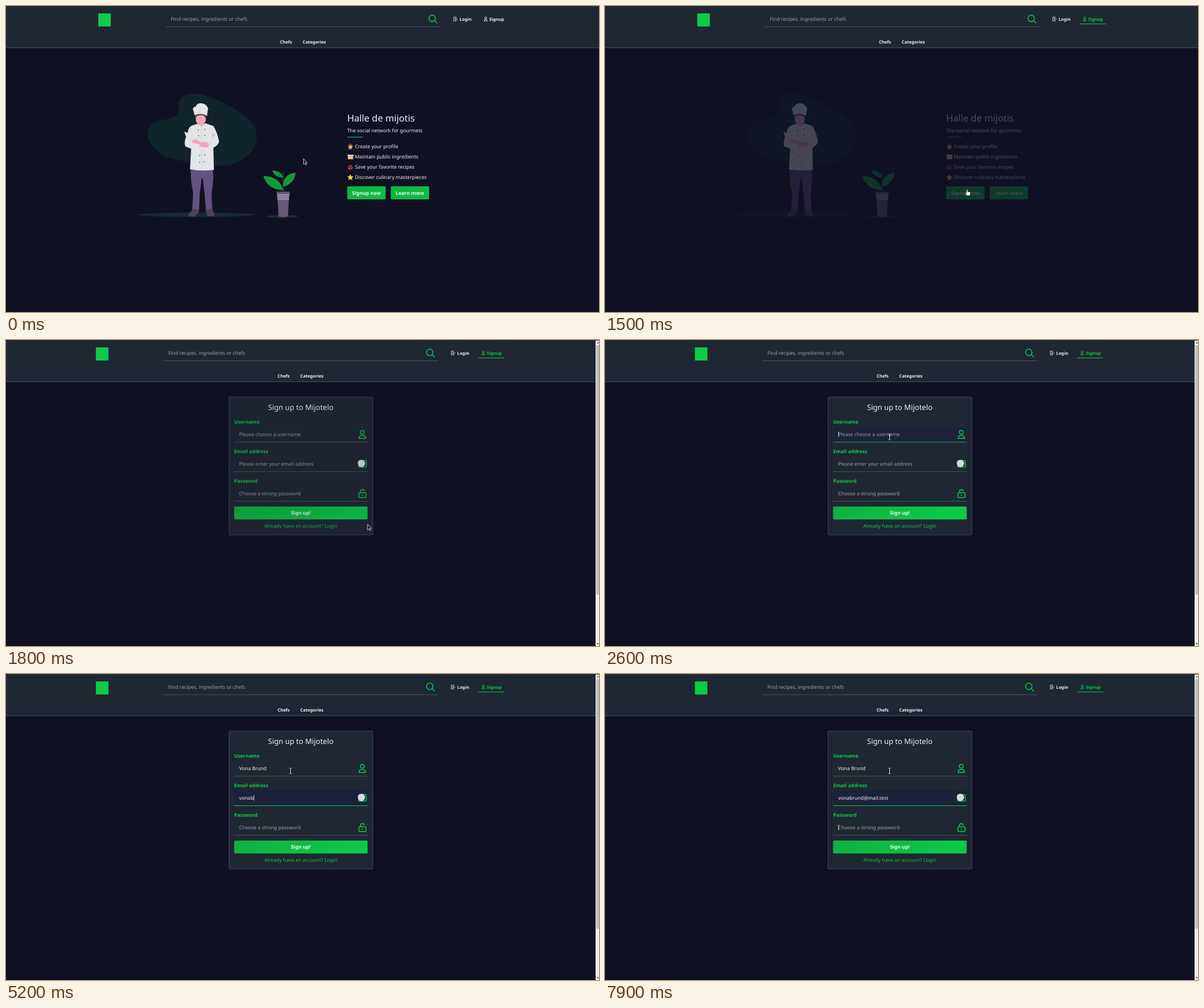
Recreate the animation shown at these times as an HTML page. Size 1041x538 px, loop 8000 ms.

```html
<!DOCTYPE html>
<html lang="en">
<head>
<meta charset="utf-8">
<title>Recipe site sign-up</title>
<style>
  html, body { margin: 0; width: 100%; height: 100%; overflow: hidden; background: #101023; }
  svg { display: block; width: 100%; height: 100%; }
  text { font: 8.69px "Noto Sans", "Open Sans", sans-serif; fill: #f2f3f5; text-rendering: geometricPrecision; white-space: pre; }
  .bold { font-weight: 700; }
  .nav { font-size: 7.6px; font-weight: 700; }
  .mid { text-anchor: middle; }
  .hint { fill: #9ca3af; }
  .green { fill: #0dcb48; }
  .line { fill: none; stroke: #0dcb48; stroke-width: 1.5; stroke-linecap: round; stroke-linejoin: round; }
  .bar { stroke: #0dcb48; stroke-width: 1.1; }
  .thin { fill: none; stroke: #f2f3f5; stroke-width: .9; }
  .rule { stroke: #465160; stroke-width: 1; }
  .active text { fill: #0dcb48; }
  .active .thin { stroke: #0dcb48; }
</style>
</head>
<body>
<svg viewBox="0 0 1041 538" preserveAspectRatio="none">
  <defs>
    <linearGradient id="wide" x2="1" y2=".2">
      <stop stop-color="#0fae40"/><stop offset="1" stop-color="#0ccb46"/>
    </linearGradient>
    <linearGradient id="small" x2="1" y2=".2">
      <stop stop-color="#0cb441"/><stop offset="1" stop-color="#0cbe44"/>
    </linearGradient>
  </defs>
  <rect width="1041" height="538" fill="#101023"/>
  <rect width="1041" height="73" fill="#1f2733"/>
  <rect width="1041" height=".8" fill="#2d3541"/>
  <path class="rule" d="M0 73.400H1041"/>

  <g id="header">
    <rect x="162" y="13" width="22" height="23" class="green"/>
    <text x="289.300" y="25.800" class="hint">Find recipes, ingredients or chefs</text>
    <path class="rule" d="M280 36.500H763"/>
    <path class="line" d="M752.800 26.300L756.600 30M753.800 21.800a5.700 5.700 0 1 1-11.400 0a5.700 5.700 0 0 1 11.400 0"/>
    <path class="thin" d="M790.500 20.300V19.600H786V26.200H790.500V25.400M793 23H788M789.800 21.200L788 23L789.800 24.800"/>
    <text x="796.300" y="25.800" class="nav">Login</text>
    <g id="signupLink">
      <circle class="thin" cx="842" cy="21" r="1.800"/>
      <path class="thin" d="M839.300 26.400q0-3 2.700-3t2.700 3z"/>
      <text x="848.300" y="25.800" class="nav">Signup</text>
    </g>
    <path id="signupRule" class="bar" d="M833 31.500H879"/>
    <text x="481" y="65.800" class="nav">Chefs</text>
    <text x="520.800" y="65.800" class="nav">Categories</text>
  </g>

  <g id="hero">
    <path fill="#10242a" d="M248.500 227C247 208 262 201 280 199.500C297 197 304 192 303 180C301 163 312 153 332 154C362 157 395 176 412 188C430 200 440 212 440 232C440 256 414 279 380 280.500C340 283 318 272 298 270C275 267 250 246 248.500 227"/>
    <ellipse cx="334.500" cy="367" rx="103" ry="3.800" fill="#172a30"/>
    <ellipse cx="485" cy="370" rx="27.500" ry="2.700" fill="#25253d"/>

    <!-- chef -->
    <path fill="#4f4253" d="M327 356L339 357V362L331 370Q325 371 320 369Q321 363 326 361ZM350 356L361 354L365 364Q367 368 364 369.500H354L351 363Z"/>
    <path fill="#635280" d="M324 286H363L364 304L361 330L362 356L351 358L348.500 330L345.500 303H343.500L340 330L339 358L327 357L328.500 330L325 308Z"/>
    <path fill="#f7a6ba" d="M337 200H348V211L343 214L337 211Z"/>
    <path fill="#e3e4e7" d="M336 207L343 212L350 206L364 211Q371 222 374 238Q373 245 364 249L365 288Q343 291 323 287L325 251L315 247Q312 241 316 230L313 221L319 223Q320 212 327 210Z"/>
    <path fill="none" stroke="#c9ccd3" stroke-width=".8" d="M343 212V234M327 225L325 237M364 230L359 242M344 250V288"/>
    <path fill="#f7a6ba" d="M326 238Q330 232 337 236L343 240Q350 236 356 242Q358 248 350 249L339 247Q344 242 328 241Z"/>
    <ellipse cx="342" cy="198.500" rx="9" ry="10.500" fill="#f7a6ba"/>
    <path fill="#594044" d="M332 198Q330 191 335 189H350Q353 192 351 199Q349 191 342 192Q335 191 332 198"/>
    <path fill="#e3e4e7" d="M331 192L328 181Q329 177 333 177Q335 170 343 171Q351 172 353 177Q356 180 354 184L353 193Q342 187 331 192"/>
    <circle cx="364" cy="227" r="3" fill="#c7c8dc"/>
    <path fill="none" stroke="#24723f" stroke-width="1.800" stroke-linecap="round" d="M337.500 218h0M349 217h0M338 228h0M349 227h0M340 263h0M349 262h0M340 275h0M348 274h0"/>

    <!-- plant -->
    <path fill="none" stroke="#464157" stroke-width="1.400" d="M486.700 293V328"/>
    <path fill="#0f9d3b" d="M486.500 324C472 323 457 317 452 299C469 299 483 307 486.500 324M487 318C486 304 493 295 508.500 293C508 304 500 314 487 318M486.500 302C477 301 470 298 467.500 289C477 289 485 294 486.500 302"/>
    <path fill="none" stroke="#0b5c2b" stroke-width=".5" d="M455 301L486 324M506 295L487 318M470 291L486 302"/>
    <path fill="#675779" d="M475 326.500H498V331H497L495 369Q494 371 491 371H482Q479 371 478.500 369L476 331H475Z"/>
    <path stroke="#a3a3b8" stroke-width="2" d="M476 332H497.500M476 335.600H497M476.500 339.200H497"/>

    <text x="599" y="203.300" style="font-size:16.400px">Halle de mijotis</text>
    <text x="599" y="221.800">The social network for gourmets</text>
    <path class="bar" d="M599 230.500H626"/>
    <g>
      <circle cx="604.500" cy="246.500" r="3.700" fill="#f7c02c"/>
      <path fill="#6a4538" d="M600 250Q599 242 604.500 242Q610 242 609 250L607.500 246L603 245L601.500 249Z"/>
      <path fill="#36a9d6" d="M600.500 252Q604.500 247.500 608.500 252Z"/>
      <path fill="#d9a05b" d="M600 263H609.500V269.500H600Z"/>
      <path fill="#ece4cb" d="M599.600 261.500H610V264H599.600ZM601 266H608.500V268H601Z"/>
      <circle cx="604.500" cy="284" r="4.300" fill="#c7383c"/>
      <path fill="#4a2830" d="M600 282H609V284H600ZM603 286H607V288H603Z"/>
      <path fill="#fbd034" d="M604.500 295.800L606.200 299.300L610 299.800L607.200 302.400L608 306.200L604.500 304.300L601 306.200L601.800 302.400L599 299.800L602.800 299.300Z"/>
    </g>
    <text x="612.500" y="250">Create your profile</text>
    <text x="612.500" y="268.100">Maintain public ingredients</text>
    <text x="612.500" y="286.200">Save your favorite recipes</text>
    <text x="612.500" y="304.200">Discover culinary masterpieces</text>
    <rect x="599" y="317" width="67.500" height="23" rx="2" fill="url(#small)"/>
    <rect x="675.300" y="317" width="67.500" height="23" rx="2" fill="url(#small)"/>
    <text x="632.700" y="331.500" class="bold mid">Signup now</text>
    <text x="709" y="331.500" class="bold mid">Learn more</text>
  </g>

  <g id="form">
    <rect x="391.500" y="100.300" width="252.500" height="242.500" rx="2" fill="#1f2733" stroke="#424d5c" stroke-width=".9"/>
    <text x="517.500" y="123" class="mid" style="font-size:13px">Sign up to Mijotelo</text>
    <g id="fields"></g>
    <rect x="400.500" y="292.700" width="234.300" height="22.800" rx="2" fill="url(#wide)"/>
    <text x="517.500" y="307.300" class="bold mid">Sign up!</text>
    <text x="517.500" y="329.700" class="green mid">Already have an account? Login</text>
  </g>

  <g id="scrollbar">
    <rect x="1035" y="1" width="6" height="537" fill="#f1f1f1"/>
    <rect x="1036" y="9" width="5" height="439" fill="#c1c1c1"/>
    <path fill="#555" d="M1037 6L1039 3.500L1041 6ZM1037 533L1039 535.500L1041 533Z"/>
  </g>

  <g id="cursor">
    <path id="arrow" fill="#111" stroke="#ddd" stroke-width=".9" d="M.3 0V9.800L2.500 7.800L4 11.200L5.600 10.500L4.200 7.200H7Z"/>
    <path id="hand" fill="#fff" stroke="#111" stroke-width=".5" d="M-2.400 1V-4.500a1 1 0 0 1 2 0V-1.700L3.200-1Q4.500-.6 4.300 1L3.500 5.500H-1.800L-4.300 2Q-4.500 .3-3.300 .5Z"/>
    <path id="beam" fill="none" stroke="#dfe1e4" stroke-width="1" d="M-2-5Q0-5 0-3.800Q0-5 2-5M0-4V4M-2 5Q0 5 0 3.800Q0 5 2 5"/>
  </g>
</svg>

<script>
const LOOP = 8000, STEP = 100;
const $ = id => document.getElementById(id);
const ramp = (t, from, to) => Math.max(0, Math.min(1, (t - from) / (to - from)));
const show = (el, on) => el.style.display = on ? '' : 'none';

const personIcon = `<circle class="line" cx="625.500" cy="162.200" r="3.300"/>
  <path class="line" d="M619.800 173q0-5.300 5.700-5.300t5.700 5.300z"/>`;
const mailIcon = `<rect class="line" x="619" y="212" width="13.500" height="11.500" rx="1.500"/>
  <circle cx="624" cy="217" r="6.400" fill="#d9dadd"/>`;
const lockIcon = `<rect class="line" x="619.500" y="268.500" width="12.500" height="8.500" rx="1.500"/>
  <path class="line" d="M622.500 268V266q0-3 3.100-3t3.100 2.500M625.700 272v1.500"/>`;

// focus: level of the highlight; keys: the moment each character appears
const fields = [
  { label: 'Username', hint: 'Please choose a username', icon: personIcon, value: 'Vona Brund',
    keys: [3100, 3200, 3300, 3400, 3600, 3600, 3700, 3800, 3900, 4000],
    focus: t => ramp(t, 2400, 2700) - ramp(t, 4100, 4200), caret: [2500, 4100] },
  { label: 'Email address', hint: 'Please enter your email address', icon: mailIcon, value: 'vonabrund@mail.test',
    keys: [4600, 4700, 4800, 4900, 5200, 5300, 5400, 5600, 5600, 6100, 6500, 6700, 6800, 6900, 7100, 7300, 7500, 7600, 7800],
    focus: t => ramp(t, 4100, 4200), caret: [4100, 7900] },
  { label: 'Password', hint: 'Choose a strong password', icon: lockIcon, value: '',
    keys: [], focus: () => 0, caret: [7900, LOOP] }
];

$('fields').innerHTML = fields.map((f, i) => {
  const y = i * 52;
  return `<g>
    <text x="400.500" y="${146.7 + y}" class="bold green">${f.label}</text>
    <rect x="400.500" y="${152 + y}" width="234.300" height="27" fill="#1c2139" class="glow"/>
    <path class="rule" d="M400.500 ${179.5 + y}H634.800"/>
    <path class="bar glow" d="M400.500 ${179.5 + y}H634.800"/>
    <text x="409.300" y="${168.7 + y}" class="value"></text>
    <rect y="${161 + y}" width=".9" height="9.500" fill="#f2f3f5" class="caret"/>
    ${f.icon}
  </g>`;
}).join('');
fields.forEach((f, i) => {
  const root = $('fields').children[i];
  f.glow = root.querySelectorAll('.glow');
  f.text = root.querySelector('.value');
  f.bar = root.querySelector('.caret');
});

const pointer = [
  [0, 522, 268.5, 'arrow'], [400, 527, 276.5, 'arrow'], [600, 563, 311.7, 'arrow'],
  [800, 645, 328, 'hand'], [900, 637, 328, 'hand'], [1700, 634.5, 324, 'arrow'],
  [2000, 620, 304, 'arrow'], [2100, 597, 275.5, 'arrow'], [2200, 548, 226, 'beam'],
  [2300, 506.5, 180.5, 'beam'], [2500, 499.5, 170.5, 'beam']
];

function drawField(f, t) {
  const typed = f.value.slice(0, f.keys.filter(k => k <= t).length);
  f.text.textContent = typed || f.hint;
  f.text.classList.toggle('hint', !typed);
  f.glow.forEach(el => el.style.opacity = f.focus(t));
  show(f.bar, t >= f.caret[0] && t < f.caret[1]);
  f.bar.setAttribute('x', 409.6 + (typed ? f.text.getComputedTextLength() : 0));
}

function draw(now) {
  const t = Math.floor(now % LOOP / STEP) * STEP;
  const onForm = t >= 1600;
  $('header').setAttribute('transform', `translate(${onForm ? -4.2 : 0} 0)`);
  $('signupLink').classList.toggle('active', t >= 1300);
  show($('signupRule'), t >= 1300);
  show($('scrollbar'), onForm);
  show($('hero'), !onForm);
  show($('form'), onForm);
  $('hero').style.opacity = 1 - ramp(t, 1350, 1550);
  $('form').style.opacity = ramp(t, 1600, 1830);
  fields.forEach(f => drawField(f, t));

  const [, x, y, shape] = pointer.filter(p => p[0] <= t).pop();
  $('cursor').setAttribute('transform', `translate(${x} ${y})`);
  for (const id of ['arrow', 'hand', 'beam']) show($(id), id === shape);
}

const start = performance.now();
function tick() {
  draw(performance.now() - start);
  requestAnimationFrame(tick);
}
tick();
</script>
</body>
</html>
```
